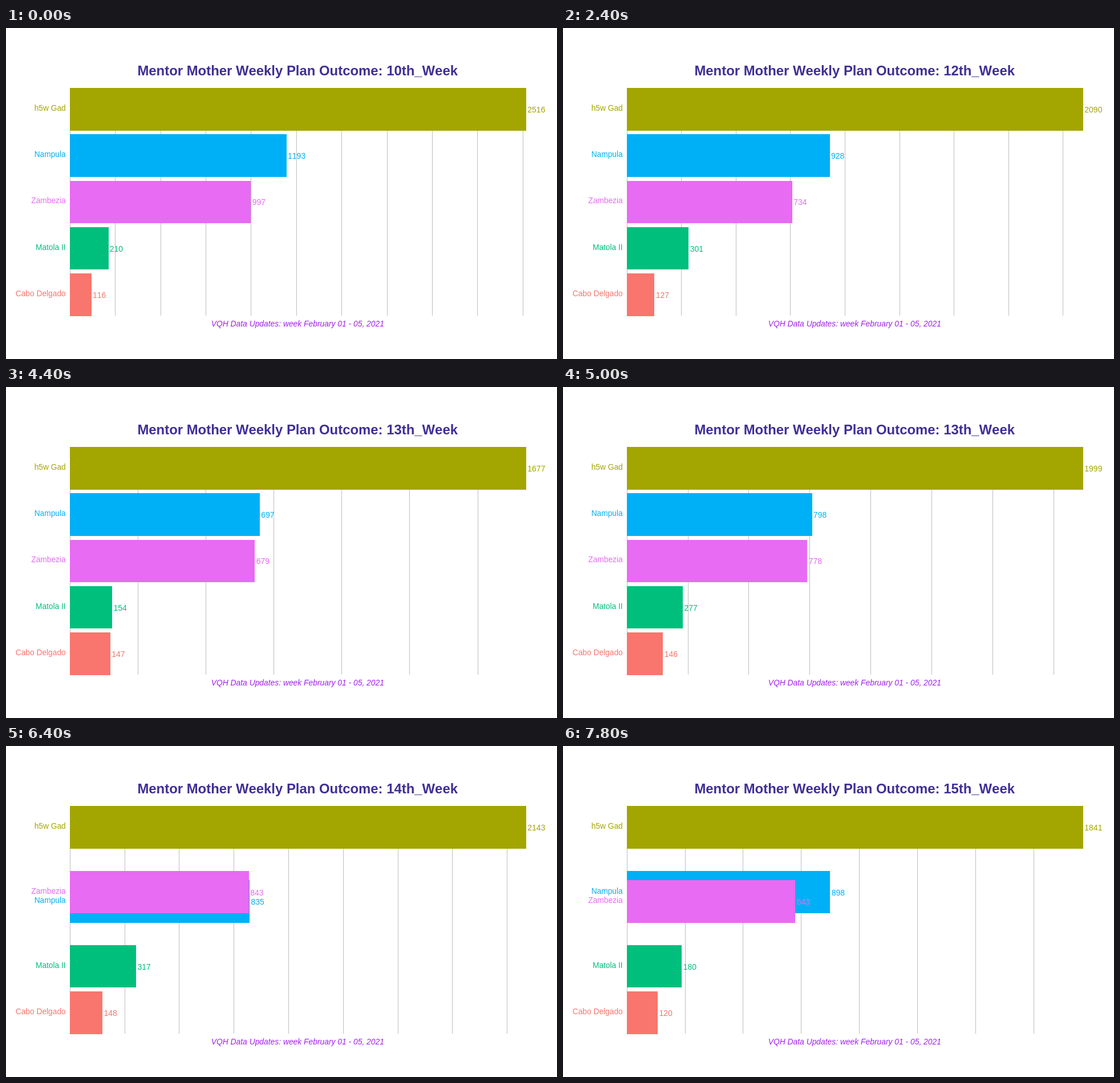
An HTML page for the animation above (8000 ms loop, 966x580 px).

```html
<!DOCTYPE html>
<html lang="en">
<head>
<meta charset="utf-8">
<title>Weekly plan outcome</title>
<style>
  html, body { margin: 0; width: 100%; height: 100%; overflow: hidden; background: #fff; }
  svg { display: block; width: 966px; height: 580px; }
  text { font: 14px "Liberation Sans", Arial, sans-serif; font-kerning: none; }
  #title { font-size: 23.9px; font-weight: bold; fill: #3f2f96; text-anchor: middle; }
  #caption { font-size: 13.85px; font-style: italic; fill: #a020f0; text-anchor: middle; }
  .name { font-size: 13.75px; text-anchor: end; }
  rect { shape-rendering: crispEdges; }
</style>
</head>
<body>
<svg id="stage" viewBox="0 0 966 580">
  <g id="grid" fill="#bebebe"></g>
  <g id="bars"></g>
  <g id="labels"></g>
  <text id="title" x="511.2" y="83"></text>
  <text id="caption" x="511.3" y="523">VQH Data Updates: week February 01 - 05, 2021</text>
</svg>
<script>
const STEP = 200, STEPS = 40;        // ms per pose, poses per loop
const PERIOD = 7, HOLD = 2, TWEEN = 5;
const LEFT = 112, X0 = 112.8, WIDTH = 799.2;
const TOP = 105.2, ROW = 81.2, BAR = 74.5;
const TICK = 250, MAX_TICKS = 11;

const series = [
  ["Cabo Delgado", "#f8766d"],
  ["h5w Gad", "#a3a500"],
  ["Matola II", "#00bf7d"],
  ["Nampula", "#00b0f6"],
  ["Zambezia", "#e76bf3"]
];
// One row per week, in the order of the series
const weeks = [
  [116, 2516, 210, 1193, 997],
  [114, 2093, 204, 930, 845],
  [127, 2090, 301, 928, 734],
  [147, 1677, 154, 697, 679],
  [146, 1999, 277, 798, 778],
  [148, 2143, 317, 835, 843],
  [120, 1841, 180, 898, 643]
];

const $ = id => document.getElementById(id);
const mix = (a, b, p) => a + (b - a) * p;
const rank = (row, i) => row.filter(v => v > row[i]).length;

function set(el, attrs) {
  for (const key in attrs) el.setAttribute(key, attrs[key]);
}
function add(parent, tag, attrs, text = "") {
  const el = document.createElementNS("http://www.w3.org/2000/svg", tag);
  set(el, attrs);
  el.textContent = text;
  return parent.appendChild(el);
}

const lines = Array.from({ length: MAX_TICKS }, () =>
  add($("grid"), "rect", { y: 106, width: 1, height: 398 }));
const items = series.map(([name, fill]) => ({
  bar: add($("bars"), "rect", { x: LEFT, fill }),
  name: add($("labels"), "text", { class: "name", x: 104.7, fill }, name),
  value: add($("labels"), "text", { fill })
}));

function draw(ms) {
  const pos = Math.floor(ms / STEP) % STEPS + 1;
  const week = Math.floor(pos / PERIOD);
  const p = Math.max(0, pos % PERIOD - HOLD) / TWEEN;
  const from = weeks[week], to = weeks[week + 1] || from;
  const now = from.map((v, i) => mix(v, to[i], p));
  const max = Math.max(...now), scale = WIDTH / max;

  lines.forEach((line, k) => set(line, {
    x: Math.floor(LEFT + 0.2 + k * TICK * scale),
    visibility: k * TICK <= max ? "visible" : "hidden"
  }));

  items.forEach((item, i) => {
    const y = TOP + ROW * mix(rank(from, i), rank(to, i), p);
    const top = Math.round(y), end = X0 + now[i] * scale;
    set(item.bar, {
      y: top,
      width: Math.round(end) - LEFT,
      height: Math.round(y + BAR) - top
    });
    set(item.name, { y: Math.round(y + 39.8) });
    set(item.value, { x: end + 2.3, y: Math.round(y + 42.8) });
    item.value.textContent = (p > 0.5 ? to : from)[i];
  });

  const shown = 10 + week + (p > 0.7 ? 1 : 0);
  $("title").textContent = `Mentor Mother Weekly Plan Outcome: ${shown}th_Week`;
}

let start;
function tick(now) {
  if (start === undefined) start = now;
  draw(now - start);
  requestAnimationFrame(tick);
}
draw(0);
requestAnimationFrame(tick);
</script>
</body>
</html>
```
